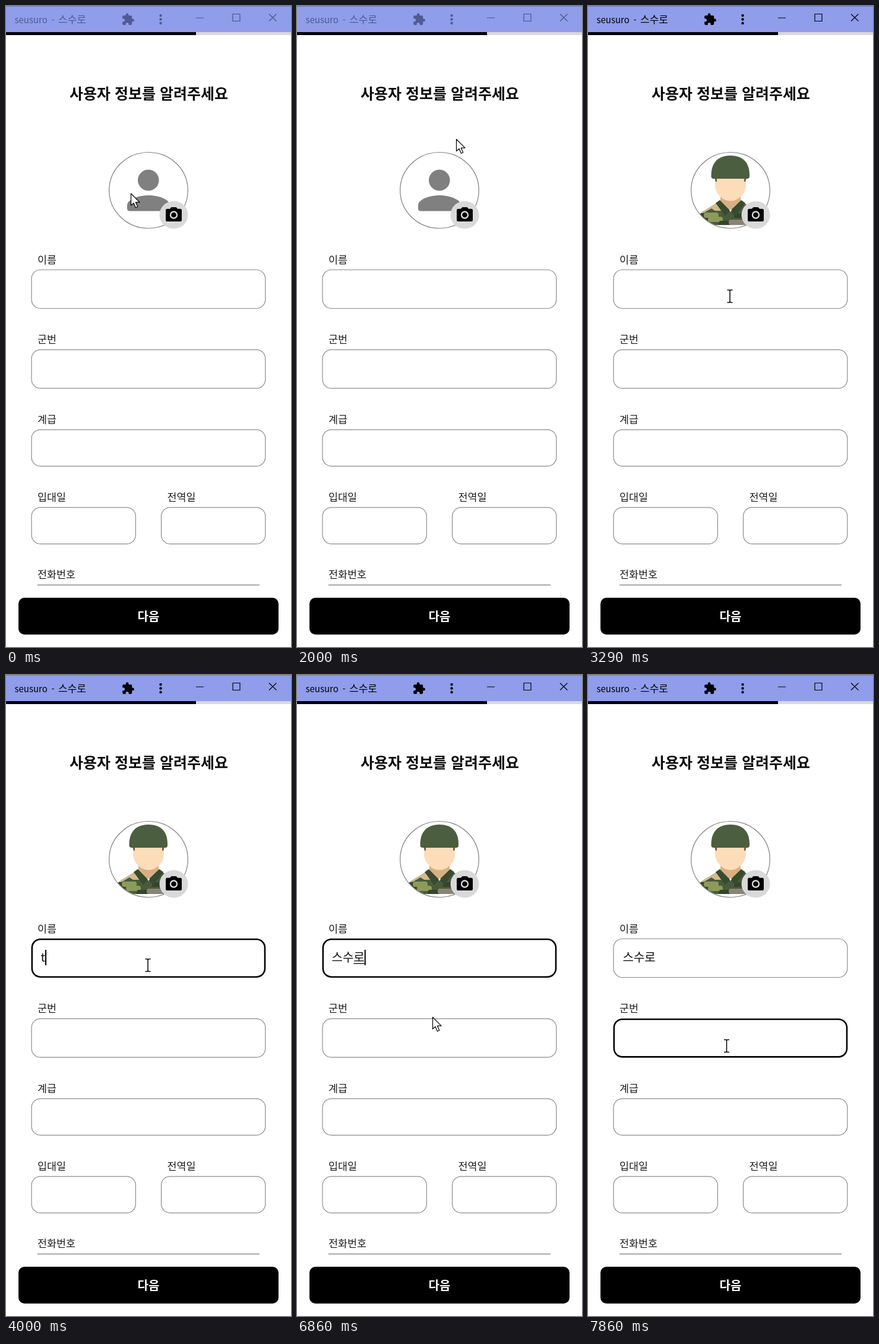
Recreate the animation shown at these times as an HTML page. Size 480x1080 px, loop 8 s.

```html
<!DOCTYPE html>
<html lang="ko">
<head>
<meta charset="utf-8">
<style>
html, body { margin: 0; width: 100%; height: 100%; overflow: hidden; background: #fff; }
svg { display: block; width: 100vw; height: 100vh; }
text { font-family: "Noto Sans CJK KR", "Noto Sans CJK", "Noto Sans CJK JP", sans-serif; }
.field { fill: none; stroke: #8a8a8a; stroke-width: 1.2; }
.field.on { stroke: #000; stroke-width: 2.6; }
.label { font-size: 17.4px; fill: #1c1c1c; }
.cursor { fill: #fff; stroke: #000; stroke-width: 1.2; stroke-linejoin: round; }
</style>
</head>
<body>
<svg viewBox="0 0 480 1080" preserveAspectRatio="none">
  <defs>
    <clipPath id="round"><ellipse cx="240" cy="310.5" rx="66" ry="63.5"/></clipPath>
    <clipPath id="torso"><path d="M181 369Q182 352 197 344L222 329H258L283 344Q298 352 299 369Z"/></clipPath>
  </defs>
  <rect width="480" height="1080" fill="#fff"/>

  <rect width="480" height="44" fill="#8f9dea"/>
  <rect width="480" height="1" fill="#6d77ad"/>
  <g id="bar">
    <g stroke="none">
      <text x="14.5" y="28.5" font-size="15">seusuro</text>
      <text x="76.5" y="28.5" font-size="15">-</text>
      <text x="88" y="29" font-size="17">스수로</text>
    </g>
    <g stroke="none">
      <path transform="translate(194.3 11.2) scale(.94)" d="M20.5 11H19V7c0-1.1-.9-2-2-2h-4V3.5C13 2.1 11.9 1 10.5 1S8 2.1 8 3.5V5H4c-1.1 0-2 .9-2 2v3.8h1.5c1.5 0 2.7 1.2 2.7 2.7s-1.2 2.7-2.7 2.7H2V20c0 1.1.9 2 2 2h3.8v-1.5c0-1.5 1.2-2.7 2.7-2.7s2.7 1.2 2.7 2.7V22H17c1.1 0 2-.9 2-2v-4h1.5c1.4 0 2.5-1.1 2.5-2.5S21.9 11 20.5 11z"/>
      <circle cx="260.5" cy="16" r="2.2"/><circle cx="260.5" cy="22.5" r="2.2"/><circle cx="260.5" cy="29" r="2.2"/>
    </g>
    <path d="M320 20H333M382 13.5H394V25.5H382ZM443 13.5L455.5 25.5M455.5 13.5L443 25.5" fill="none" stroke-width="1.2"/>
  </g>
  <rect y="44" width="320" height="5"/>
  <rect x="320" y="44" width="160" height="5" fill="#d9d9d9"/>

  <text x="240.5" y="156.5" font-size="25" font-weight="600" text-anchor="middle" fill="#0a0a0a">사용자 정보를 알려주세요</text>

  <g id="blank" fill="#808080">
    <circle cx="239.8" cy="293.5" r="17.8"/>
    <path d="M204 336C204 325 225 319 240 319S276 325 276 336V341Q276 345.5 271.5 345.5H208.5Q204 345.5 204 341Z"/>
  </g>
  <g id="soldier" clip-path="url(#round)">
    <g clip-path="url(#torso)">
      <rect x="180" y="325" width="122" height="45" fill="#4a5b3c"/>
      <path d="M182 352L206 337L222 331L230 345H214L208 341L196 348Z" fill="#d2bb8c"/>
      <path d="M190 349H214V356H226V361H204V367H186Z" fill="#34452c"/>
      <rect x="195" y="348" width="25" height="9" rx="4" fill="#8d9a59"/>
      <rect x="202" y="355" width="25" height="9" rx="4" fill="#8d9a59"/>
      <path d="M222 362H240V370H218Z" fill="#34452c"/>
      <rect x="237" y="360" width="32" height="9" rx="4" fill="#8b8377"/>
      <path d="M246 349H262V357H246Z" fill="#34452c"/>
    </g>
    <path d="M223 318H257V331L240 345L223 331Z" fill="#d9b083"/>
    <path d="M222 327L239.5 345L231 354L215 332ZM258 327L239.5 345L248 354L265 332Z" fill="#384b30"/>
    <path d="M238 344L240 342L242 344L240 347Z" fill="#fff"/>
    <path d="M214 289H266V304Q265 315 254 324Q240 333 226 324Q215 315 214 304Z" fill="#fddcb9"/>
    <path d="M213 289H217V296H215ZM263 289H267L265 296H263Z" fill="#76563d"/>
    <path d="M207.5 287C207 262 221 252 240 252S273 262 272 287Q272 291 268 291H212Q207.5 291 207.5 287Z" fill="#4b5e3f"/>
  </g>
  <ellipse cx="240" cy="310.5" rx="66.3" ry="64" fill="none" stroke="#808080" stroke-width="1.2"/>
  <ellipse cx="282.5" cy="352" rx="24" ry="23.2" fill="#d9d9d9"/>
  <path d="M278.4 339H286.6L289 341.7H293.5Q296 341.7 296 344.2V360.5Q296 363 293.5 363H271.5Q269 363 269 360.5V344.2Q269 341.7 271.5 341.7H276Z"/>
  <circle cx="282.5" cy="352" r="5.5" stroke="#d9d9d9" stroke-width="2.4"/>

  <g id="form"></g>
  <path d="M53 975.5H427" stroke="#8a8a8a" stroke-width="1.3"/>
  <rect x="21" y="997" width="438" height="62" rx="10"/>
  <text x="240" y="1036" font-size="20" font-weight="700" text-anchor="middle" fill="#fff">다음</text>

  <text id="typed" x="58.5" y="482.5" font-size="20" fill="#111"></text>
  <rect id="under" y="485.5" width="18.4" height="1.3"/>
  <rect id="caret" width="2"/>

  <g id="arrow" class="cursor"><path d="M.5.5V20.5L5 16.5L8.4 24.3L11.8 22.8L8.4 15.2H15Z"/></g>
  <g id="hand" class="cursor">
    <path d="M-2 16V2Q-2 0 .2 0T2.4 2V9Q3 7.6 4.8 7.8Q6.6 8 6.8 9.6Q7.6 8.4 9.2 8.8Q10.8 9.2 11 10.8Q12 9.8 13.2 10.4Q14.6 11 14.6 13V20Q14.6 24 11.5 26.5V28Q8 30 4 30Q0 30 -1 26.5L-6.8 18.5Q-8 16.3 -6.5 15.2Q-5 14.2 -3.5 15.6Z"/>
    <path d="M2.4 9V15M6.8 10V15.5M11 11V16" fill="none"/>
  </g>
  <g id="beam" fill="none" stroke="#000" stroke-width="1.5">
    <path d="M-4.5 -10.5H-1.5Q0 -10.5 0 -9Q0 -10.5 1.5 -10.5H4.5M0 -9.5V9.5M-4.5 10.5H-1.5Q0 10.5 0 9Q0 10.5 1.5 10.5H4.5"/>
  </g>
</svg>
<script>
const LOOP = 8000, GLYPH = 18.4, TEXT_X = 58.5;
const el = id => document.getElementById(id);
const set = (node, attrs) => { for (const k in attrs) node.setAttribute(k, attrs[k]); };
const show = (id, on) => el(id).style.display = on ? "" : "none";
const at = (steps, t) => steps.findLast(s => s[0] <= t);

// label, x, y, width, height
const fields = [
  ["이름", 43, 444.5, 393.8, 65],
  ["군번", 43, 579.2, 393.8, 65],
  ["계급", 43, 713.8, 393.8, 61.5],
  ["입대일", 43, 844.8, 175.3, 61.5],
  ["전역일", 261.5, 844.8, 175.3, 61.5],
];
el("form").innerHTML = fields.map(([name, x, y]) =>
  `<text class="label" x="${x + 10}" y="${y - 11}">${name}</text><rect class="field"/>`
).join("") + '<text class="label" x="53" y="964.3">전화번호</text>';
const boxes = document.querySelectorAll(".field");

// The focused outline grows inwards
function drawField(box, i, on) {
  const [, x, y, w, h] = fields[i], inset = on ? .8 : 0;
  set(box, { x: x + inset, y: y + inset, width: w - 2 * inset, height: h - 2 * inset, rx: 15 - inset });
  box.classList.toggle("on", on);
}

// The pointer is sampled, so it jumps: time, shape, x, y
const pointer = [
  [0, "arrow", 210, 315.5], [140, "hand", 215, 315],
  [570, "hand", 206, 270], [710, "hand", 190, 150], [860, "hand", 168, 27],
  [1000, "hand", 142, 80], [1140, "hand", 137, 170], [1290, "hand", 148.5, 215],
  [1430, "arrow", 275, 186], [1570, "arrow", 271, 170], [1710, "arrow", 266, 190],
  [1860, "arrow", 267, 214], [2000, "arrow", 268, 224],
  [2710, "arrow", 262, 290], [2860, "arrow", 248, 400], [3000, "beam", 240, 492],
  [3290, "beam", 239, 489],
  [6710, "arrow", 236, 530], [6860, "arrow", 228, 576], [7000, "beam", 230, 600],
  [7140, "beam", 232, 614], [7290, "beam", 233, 622], [7430, "beam", 233.5, 625],
];
const typing = [[0, ""], [4000, "t"], [4570, ""], [5000, "스"], [5140, "스수"], [5290, "스술"], [5430, "스수로"]];
const focus = [[0, -1], [3430, 0], [7430, 1]];
const blink = [[0, 0], [3430, 1], [3860, 0], [4000, 1], [4430, 0], [4570, 1], [6000, 0], [6430, 1], [7000, 0], [7430, 1], [7860, 0]];

function draw(t) {
  const active = t >= 2430, photo = t >= 2570;
  set(el("bar"), { fill: active ? "#000" : "#505a94", stroke: active ? "#000" : "#4a5283" });
  show("blank", !photo);
  show("soldier", photo);

  const current = at(focus, t)[1], text = at(typing, t)[1], latin = text === "t";
  boxes.forEach((box, i) => drawField(box, i, i === current));
  el("typed").textContent = text;
  set(el("under"), { x: TEXT_X + GLYPH * (text.length - 1) });
  show("under", current === 0 && text && !latin);

  const width = latin ? 7.5 : text.length * GLYPH;
  set(el("caret"), current === 1
    ? { x: 59.5, y: 600.5, height: 22 }
    : { x: TEXT_X + width, y: 463, height: 26 });
  show("caret", at(blink, t)[1]);

  const [, shape, x, y] = at(pointer, t);
  for (const id of ["arrow", "hand", "beam"]) show(id, id === shape);
  set(el(shape), { transform: `translate(${x} ${y})` });
}

const start = performance.now();
function tick() {
  draw((performance.now() - start) % LOOP);
  requestAnimationFrame(tick);
}
tick();
</script>
</body>
</html>
```
